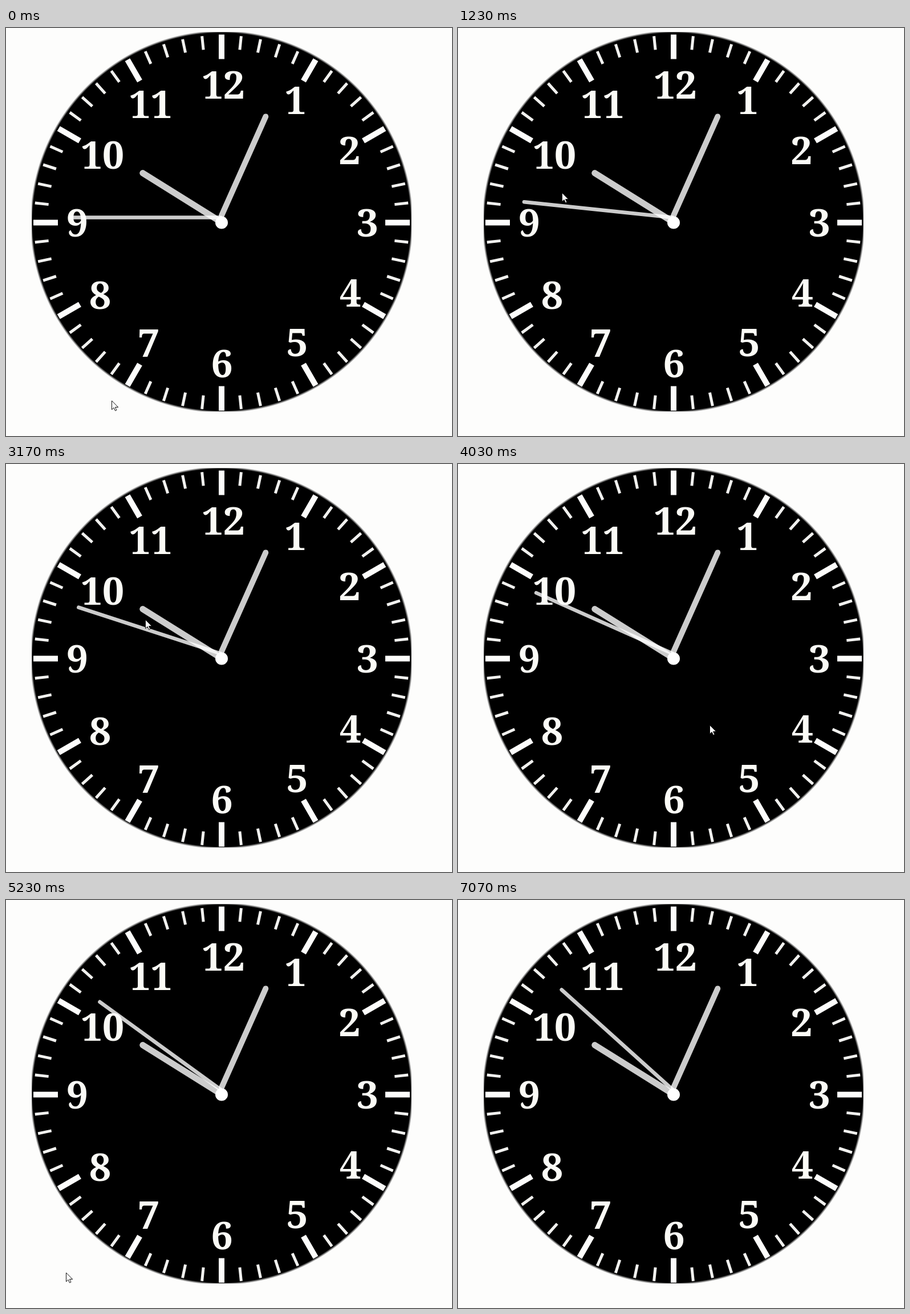
These frames come from a looping animation (782x716 px, 7110 ms). An HTML page with a canvas:

```html
<!DOCTYPE html>
<html lang="en">
<head>
<meta charset="utf-8">
<title>Clock</title>
<style>
html, body { margin: 0; width: 100%; height: 100%; overflow: hidden; background: #fdfdfc; }
canvas { display: block; }
</style>
</head>
<body>
<canvas width="782" height="716"></canvas>
<script>
const ctx = document.querySelector('canvas').getContext('2d');
const LOOP = 7110, CX = 378, CY = 341.5;

// label, ink centre x, baseline y
const numerals = [
  ['12', 380.5, 123.5], ['1', 507, 150.5], ['2', 602, 238.5], ['3', 633, 365.5],
  ['4', 603.5, 489], ['5', 510, 576], ['6', 379, 613], ['7', 250, 576.5],
  ['8', 165, 492.5], ['9', 124.5, 366], ['10', 169, 247], ['11', 253, 158]
];

// time, x, y
const pointer = [
  [0, 185, 654], [1230, 182, 289], [2330, 546, 271],
  [3170, 244, 273], [4030, 441, 458], [5230, 105, 654]
];
const POINTER_END = 5400;
const arrow = new Path2D('M0 0V15.2L3.6 11.9L6 17.2L8.4 16.2L6 11H10.8Z');

// soft-edged black dial
const dial = ctx.createRadialGradient(CX, 340, 331.5, CX, 340, 335.5);
dial.addColorStop(0, '#000');
dial.addColorStop(1, 'rgba(0,0,0,0)');

function ray(x, y, degrees, from, to, width, color, cap) {
  const a = degrees * Math.PI / 180, s = Math.sin(a), c = -Math.cos(a);
  ctx.beginPath();
  ctx.moveTo(x + from * s, y + from * c);
  ctx.lineTo(x + to * s, y + to * c);
  ctx.lineWidth = width;
  ctx.strokeStyle = color;
  ctx.lineCap = cap;
  ctx.stroke();
}

function drawFace() {
  ctx.fillStyle = dial;
  ctx.fillRect(45, 7, 666, 666);

  for (let i = 0; i < 60; i++) {
    if (i % 5) ray(CX, CY, i * 6, 305, 329, 5, '#f1f1ef', 'butt');
    else ray(CX, CY, i * 6, 287, 330, 10, '#fdfdfc', 'butt');
  }

  ctx.font = 'bold 68px "Noto Serif", serif';
  ctx.fillStyle = '#fbfbf6';
  for (const [label, x, y] of numerals) {
    const m = ctx.measureText(label);
    ctx.fillText(label, x + (m.actualBoundingBoxLeft - m.actualBoundingBoxRight) / 2, y);
  }
}

function drawHands(t) {
  const hand = (x, y, angle, length, width) =>
    ray(x, y, angle, 0, length, width, 'rgba(255,255,255,.8)', 'round');
  hand(CX, 341, 302, 163, 11);
  hand(CX, 329, 24, 190, 10);
  hand(376, 332.5, 270 + 6 * Math.floor((t + 490) / 951), 261.5, 6.5);
  ctx.beginPath();
  ctx.arc(CX, CY, 11, 0, 2 * Math.PI);
  ctx.fillStyle = '#fff';
  ctx.fill();
}

// Catmull-Rom through the pointer stops
function spline(a, b, c, d, u) {
  return b + u / 2 * (c - a + u * (2 * a - 5 * b + 4 * c - d + u * (3 * (b - c) + d - a)));
}

function drawPointer(t) {
  if (t >= POINTER_END) return;
  const last = pointer.length - 1;
  let i = 0;
  while (i < last - 1 && t >= pointer[i + 1][0]) i++;
  const at = k => pointer[Math.max(0, Math.min(last, k))];
  const start = at(i)[0];
  const u = Math.min(1, (t - start) / (at(i + 1)[0] - start));
  const [x, y] = [1, 2].map(k => spline(at(i - 1)[k], at(i)[k], at(i + 1)[k], at(i + 2)[k], u));

  ctx.save();
  ctx.translate(Math.round(x) + .5, Math.round(y) + .5);
  ctx.fillStyle = '#fff';
  ctx.fill(arrow);
  ctx.lineWidth = 1;
  ctx.strokeStyle = '#111';
  ctx.stroke(arrow);
  ctx.restore();
}

function frame() {
  const t = performance.now() % LOOP;
  ctx.fillStyle = '#fdfdfc';
  ctx.fillRect(0, 0, 782, 716);
  drawFace();
  drawHands(t);
  drawPointer(t);
  requestAnimationFrame(frame);
}
frame();
</script>
</body>
</html>
```
